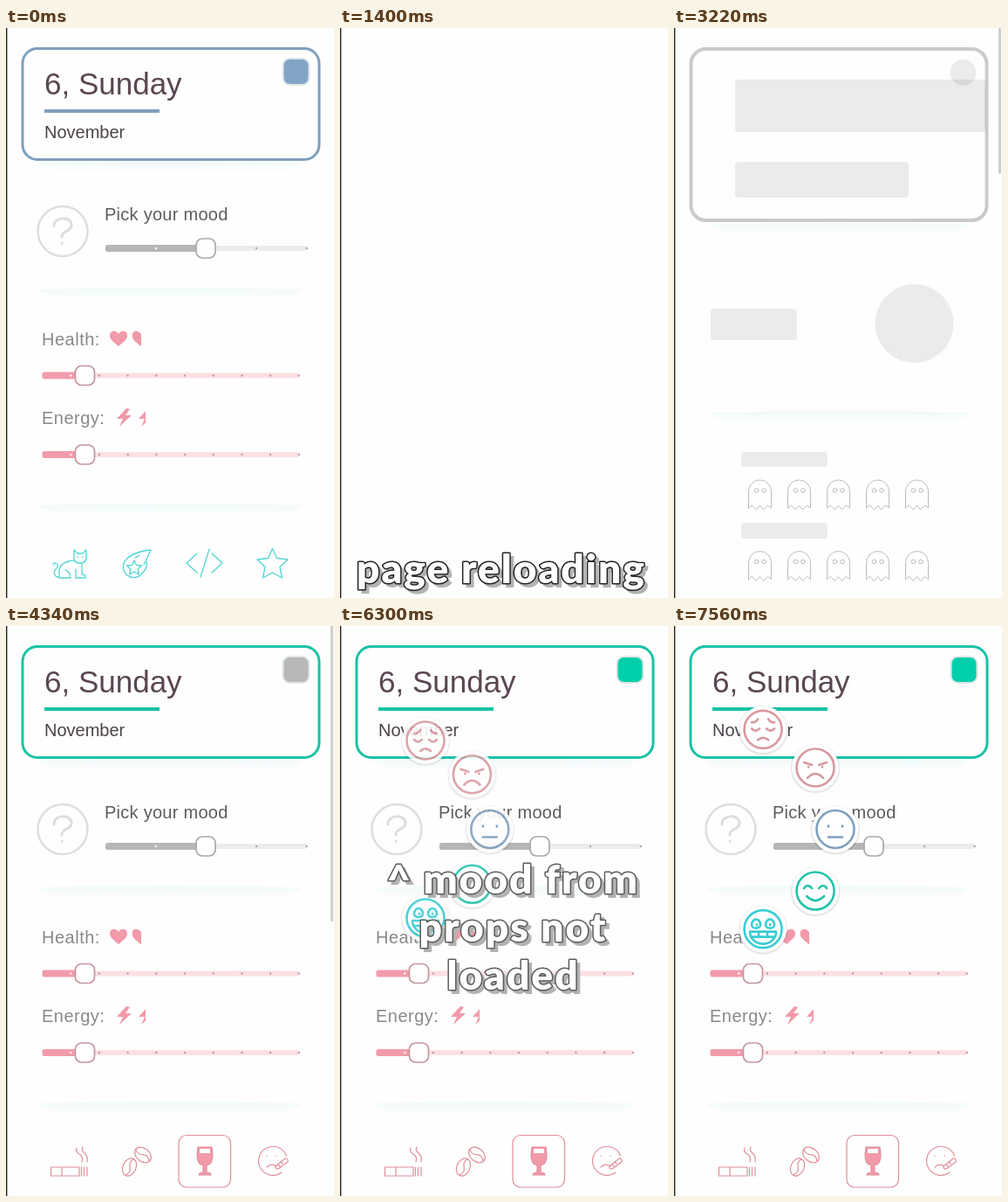
Write an HTML page that moves like this. It is 376 px wide and 652 px high and loops after 7.63 s.

```html
<!DOCTYPE html>
<html lang="en">
<head>
<meta charset="utf-8">
<title>Mood diary</title>
<style>
html, body { margin: 0; width: 100%; height: 100%; overflow: hidden; background: #fefefe; }
svg { display: block; width: 376px; height: 652px; }
text { font-family: "Liberation Sans", Arial, sans-serif; }
.line { fill: none; stroke-linecap: round; stroke-linejoin: round; }
.label { font-size: 20px; fill: #898989; letter-spacing: .5px; }
.caption text { font: 900 46px Lato, sans-serif; letter-spacing: 2px; text-anchor: middle; }
.caption .shade { fill: #b2b2b2; stroke: #b2b2b2; stroke-width: 2; }
.caption .face { fill: #fff; stroke-width: 3; paint-order: stroke; stroke-linejoin: round; }
</style>
</head>
<body>
<svg viewBox="0 0 376 652">
  <defs>
    <linearGradient id="mint" x2="0" y2="1">
      <stop stop-color="#effaf9"/><stop offset="1" stop-color="#fefefe"/>
    </linearGradient>
    <path id="band" d="M0 2Q150-2 304 2L286 13H20Z" fill="url(#mint)"/>
    <path id="heart" d="M10 17C4 12 0 9 0 5C0-1 7-2 10 3C13-2 20-1 20 5C20 9 16 12 10 17Z"/>
    <path id="bolt" d="M11 0L0 12H7L3 21L17 8H10L15 1Z"/>
    <g id="ghost" class="line" stroke="#bdbdbd">
      <path d="M.5 33V14a13 13 0 0 1 26 0V33l-4-3-5 5-4-5-4 5-5-5z"/>
      <circle cx="9.5" cy="13" r="2.3"/><circle cx="18" cy="13" r="2.3"/>
    </g>
    <clipPath id="halfHeart"><path d="M0-2H10.5V20H0Z"/></clipPath>
    <clipPath id="halfBolt"><path d="M0-2H8V24H0Z"/></clipPath>
  </defs>

  <g id="skeleton">
    <use href="#band" x="38" y="223"/><use href="#band" x="38" y="438"/>
    <rect x="19.5" y="24" width="339" height="196" rx="17" fill="none" stroke="#cacaca" stroke-width="4"/>
    <g fill="#000" fill-opacity=".075">
      <rect x="70" y="59" width="287" height="60" rx="4"/>
      <rect x="70" y="153" width="199" height="41" rx="4"/>
      <circle cx="331.5" cy="51" r="15"/>
      <rect x="42" y="321" width="99" height="36" rx="4"/>
      <circle cx="275.5" cy="338" r="45"/>
      <rect x="77" y="485" width="99" height="17" rx="4"/>
      <rect x="77" y="566" width="99" height="18" rx="4"/>
    </g>
    <g id="ghosts"></g>
  </g>

  <g id="page">
    <use href="#band" x="36" y="152"/><use href="#band" x="36" y="297"/><use href="#band" x="36" y="544"/>
    <rect id="frame" x="19" y="23.5" width="340" height="127" rx="17" fill="#fefefe" stroke-width="3"/>
    <rect id="badge" x="317.5" y="35" width="30" height="30" rx="8" stroke="#dfe6e8" stroke-width="2"/>
    <text x="44" y="76" font-size="35" fill="#5a4652">6, Sunday</text>
    <path id="rule" d="M44 95H176" stroke-width="4"/>
    <text x="44" y="126" font-size="20" fill="#4b444b">November</text>

    <g class="line" stroke="#dedede" stroke-width="3">
      <circle cx="65" cy="232.5" r="28.5" stroke-width="2.5"/>
      <path d="M55 227C54 215 76 215 75 226C74 234 64 231 64 239M64 246v.5"/>
    </g>
    <text x="113" y="219.500" class="label" style="fill:#5c5c5c;letter-spacing:.27px">Pick your mood</text>
    <g id="sliders"></g>

    <text x="41" y="363" class="label">Health:</text>
    <text x="41" y="453" class="label">Energy:</text>
    <g fill="#f19aa9">
      <use href="#heart" x="119" y="347"/>
      <g transform="translate(144.500 347)"><use href="#heart" clip-path="url(#halfHeart)"/></g>
      <use href="#bolt" x="127" y="435"/>
      <g transform="translate(152 435)"><use href="#bolt" clip-path="url(#halfBolt)"/></g>
    </g>

    <g id="hobbies" class="line" stroke="#52d6d6" stroke-width="1.3">
      <path d="M78 597l4 4h6l4-4v10q-1 5-7 5t-7-5zM78 609q-15 1-17 11v9h13q-1-8-6-9M91 629h-11v-10M87 612v13q5 0 4 4M61 628h-3q-5-4-1-9 5-5 0-7-3 0-3 2M82 605v.5M88 605v.5"/>
      <path d="M166 597C151 599 142 602 137 609A12 12 0 1 0 156 624C162 618 163 612 160 610ZM153 603l-5 3M162 606l-4 8"/>
      <path d="M147 609l2.500 5.500 6 .5-4.500 4 1.500 6-5.500-3-5.500 3 1.500-6-4.500-4 6-.5z"/>
      <path d="M219 601L207 612l12 11M236 601l12 11-12 11M233 596l-10 32"/>
      <path d="M305.500 595.500l5 11 12.500 1.500-9 8.500 2.500 12.500-11-6-11 6 2.500-12.500-9-8.500 12.500-1.500z"/>
    </g>
    <g id="habits" class="line" stroke="#df909c" stroke-width="1.200">
      <path d="M51.500 619H84V629H51.500ZM64 619v10M86.500 619v10M89.500 619v10M93 619v10M81 597q-2 4 3 7t3 9M88 596q-2 4 2 7t3 10"/>
      <g transform="rotate(25 141.500 619)"><ellipse cx="141.500" cy="619" rx="7.500" ry="10.500"/><path d="M142 608.500q-4 5 0 10t-1 11"/></g>
      <g transform="rotate(-50 157 605)"><ellipse cx="157" cy="605" rx="7.500" ry="10.500"/><path d="M157 594.500q-4 5 0 10t-1 11"/></g>
      <rect id="chosen" x="198" y="582.500" width="59.500" height="59.500" rx="9"/>
      <path id="wine" d="M220 596h16l1 9q0 11-7 12v8q5 0 5 3h-14q0-3 5-3v-8q-7-1-7-12z"/>
      <path id="wineTop" d="M222 598h12v5h-12z" fill="#fefefe" stroke="none"/>
      <path d="M321.500 606A16.500 16.500 0 1 0 316 625M299 606v.5M310 606v.5M299 619q5-5 11-1M309 618l11-9q4 0 3 4l-11 8q-4 0-3-3zM314 618l-2-2M317 615l-2-2"/>
    </g>
  </g>

  <g id="moods"></g>
  <g id="reloading" class="caption" stroke="#242424"></g>
  <g id="notLoaded" class="caption" stroke="#5c5c5c"></g>
  <rect id="scroll" x="372" y="-4" width="3" rx="1.500" fill="#cecece"/>
  <path d="M.7 0V652" stroke="#252525" stroke-width="1.400"/>
</svg>
<script>
const LOOP = 7630;
const $ = id => document.getElementById(id);
const clamp = v => Math.max(0, Math.min(1, v));
const span = (t, a, b) => clamp((t - a) / (b - a));
const set = (id, attrs) => { for (const k in attrs) $(id).setAttribute(k, attrs[k]); };
const show = (id, on) => set(id, { display: on ? 'inline' : 'none' });

const BLUE = '#7f9fbe', GREEN = '#17c3a6', GREY = '#c4c4c4';

for (const y of [516, 597.5])
  for (let i = 0; i < 5; i++)
    $('ghosts').innerHTML += `<use href="#ghost" x="${85 + 45 * i}" y="${y}"/>`;

function slider(x, end, y, knob, step, track, fill, edge) {
  let dots = '';
  for (let d = x + step; d < end + 1; d += step)
    dots += `<circle cx="${d}" cy="${y}" r="1.200" fill="${d < knob ? '#fff' : edge}"/>`;
  $('sliders').innerHTML += `
    <rect x="${x}" y="${y - 3}" width="${end - x}" height="6" rx="2.500" fill="${track}"/>
    <rect x="${x}" y="${y - 4}" width="${knob - x}" height="8" rx="2.500" fill="${fill}"/>${dots}
    <rect x="${knob - 11}" y="${y - 11}" width="22" height="22" rx="7" fill="#fff" stroke="${edge}" stroke-width="1.700"/>`;
}
slider(114, 345, 252, 229, 57.7, '#ececec', '#b6b6b6', '#aaa');
for (const y of [397.5, 488])
  slider(41.5, 336, y, 90.5, 32.7, '#fbe0e4', '#f19cab', '#c5979f');

const faces = [
  ['#d8999f', 'M-13-1q4 5 9 0M4-1q5 5 9 0M-13-8q5 0 7-4M13-8q-5 0-7-4M-6 12q6-5 12 0'],
  ['#d8999f', 'M-13-6l9 3M13-6l-9 3M-8-1v.5M8-1v.5M-9 12q9-10 18 0'],
  ['#7f9fbe', 'M-8-4v1M8-4v1M-8 9h16'],
  ['#21c3a9', 'M-13-3q4-6 9 0M4-3q5-6 9 0M-10 6q10 10 20 0'],
  ['#38cdd3', 'M-15 3h30a15 14 0 0 1-30 0zM-13 9h26M-5 3v6M5 3v6M-13-5a5 6 0 0 1 10 0 5 4 0 0 1-10 0zM3-5a5 6 0 0 1 10 0 5 4 0 0 1-10 0zM-7-5v.5M8-5v.5']
];
$('moods').innerHTML = faces.map(([color, d]) => `<g>
  <circle cy="1" r="28.500" fill="#000" opacity=".06"/><circle cy=".6" r="27.700" fill="#000" opacity=".06"/>
  <circle r="27" fill="#fff"/>
  <g class="line" stroke="${color}" stroke-width="2.600"><circle r="21.500"/><path d="${d}"/></g></g>`).join('');

function caption(id, x, y, lines) {
  const layer = (cls, off) => lines.map((s, i) =>
    `<text class="${cls}" x="${x + 1 + off}" y="${y + 55 * i + off}">${s}</text>`).join('');
  $(id).innerHTML = layer('shade', 4) + layer('face', 0);
}
caption('reloading', 184, 635, ['page reloading']);
caption('notLoaded', 197.5, 306, ['^ mood from', 'props not', 'loaded']);

function mix(a, b, k) {
  return `rgb(${a.map((v, i) => Math.round(v + (b[i] - v) * k))})`;
}

function draw(t) {
  const before = t < 1400, ready = t >= 4270;
  const theme = before ? BLUE : ready ? GREEN : GREY;

  show('skeleton', t >= 3220 && t < 3570);
  show('page', before || t >= 3570);
  set('page', { opacity: before ? 1 - span(t, 980, 1400) : 1 });
  set('frame', { stroke: theme });
  set('rule', { stroke: theme });
  set('badge', { fill: before ? '#82a5c7' : mix([184, 184, 184], [0, 207, 171], span(t, 4340, 4760)) });

  show('hobbies', before);
  show('habits', !before);
  show('chosen', ready);
  show('wineTop', ready);
  set('wine', { fill: ready ? '#f19aa9' : 'none' });

  show('scroll', t >= 3220 && t < 4900);
  set('scroll', { height: t < 3570 ? 171 : 342, opacity: 1 - span(t, 4400, 4900) });

  show('reloading', t >= 70 && t < 1960);
  show('notLoaded', t >= 4900 && t < 7350);

  // moods fan out from the question mark
  const p = span(t, 5900, 6500), k = p * (2 - p);
  show('moods', k > 0);
  [...$('moods').children].forEach((g, i) => {
    const a = (i - 2) * Math.PI / 5, r = 120 * k;
    g.setAttribute('transform', `translate(${65 + r * Math.cos(a)} ${232.5 + r * Math.sin(a)})`);
    g.setAttribute('opacity', k);
  });
}

const start = performance.now();
function tick() {
  draw((performance.now() - start) % LOOP);
  requestAnimationFrame(tick);
}
tick();
</script>
</body>
</html>
```
